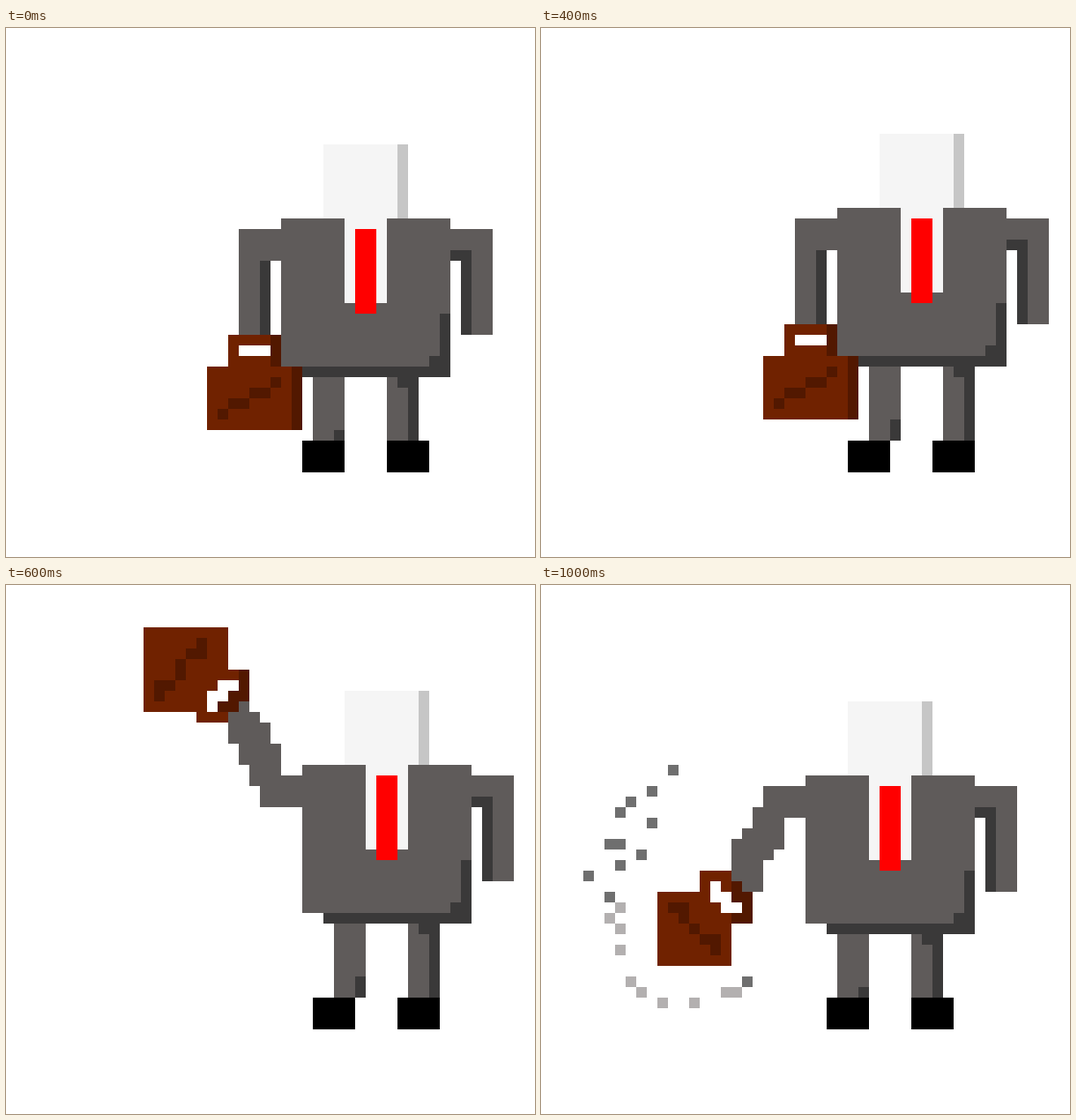
An HTML page that plays this animation: 600 px wide and 600 px high, repeating every 1.2 s.

```html
<!DOCTYPE html>
<html lang="en">
<head>
<meta charset="utf-8">
<title>Briefcase swing</title>
<style>
html, body { margin: 0; width: 100%; height: 100%; overflow: hidden; background: #fff; }
svg { display: block; width: 100%; height: 100%; shape-rendering: crispEdges; }

.suit { fill: #5f5b5a; }
.fold { fill: #3a3939; }
.skin { fill: #f5f5f5; }
.edge { fill: #c6c6c6; }
.tie { fill: #f00; }
.case { fill: #702200; }
.gap { fill: #fff; }

/* one-cell-high strips */
.seam, .dust, .haze { fill: none; stroke-width: 1; transform: translateY(.5px); }
.seam { stroke: #521800; }
.dust { stroke: #6f6f6f; }
.haze { stroke: #b3b0b0; }

.body, .feet, .rest, .swing { animation: 1.2s step-end infinite; }
.body { animation-name: sway; }
.feet { animation-name: shuffle; }
.rest { animation-name: rest; }
.swing { animation-name: swing; visibility: hidden; }
.raise { animation-delay: -.6s; }
.level { animation-delay: -.4s; }
.lower { animation-delay: -.2s; }

@keyframes sway {
  0%, 100% { transform: translate(0, 0); }
  16.66666% { transform: translate(1px, 0); }
  33.33333%, 50% { transform: translate(2px, -1px); }
  66.66666% { transform: translate(1px, -1px); }
  83.33333% { transform: translate(-1px, 0); }
}
@keyframes shuffle {
  0%, 66.66666%, 100% { transform: translate(0, 0); }
  16.66666% { transform: translate(1px, 0); }
  83.33333% { transform: translate(-1px, 0); }
}
@keyframes rest {
  0% { visibility: visible; }
  50%, 100% { visibility: hidden; }
}
@keyframes swing {
  0% { visibility: visible; }
  16.66666%, 100% { visibility: hidden; }
}
</style>
</head>
<body>
<svg viewBox="0 0 50 50">
  <g class="body">
    <!-- legs run one row long so they still reach the shoes when the body lifts -->
    <path class="suit" d="M29 33h3v7h-3zM36 33h3v7h-3z"/>
    <path class="fold" d="M31 38h1v2h-1zM37 33h2v7h-1v-6h-1z"/>
    <path class="skin" d="M30 11h7v7h-7z"/>
    <path class="edge" d="M37 11h1v7h-1z"/>
    <path class="suit" d="M26 18h16v14h-16zM42 19h4v10h-2v-8h-2z"/>
    <path class="fold" d="M28 32h12v-1h1v-4h1v6h-14zM42 21h2v8h-1v-7h-1z"/>
    <path class="skin" d="M32 18h4v8h-4z"/>
    <path class="tie" d="M33 19h2v8h-2z"/>
    <g class="rest">
      <path class="suit" d="M22 19h4v3h-2v7h-2z"/>
      <path class="fold" d="M24 22h1v7h-1z"/>
      <path class="case" d="M21 29h5v3h2v6h-9v-6h2z"/>
      <path class="seam" d="M25 29h1m-1 1h1m-1 1h1M27 32h1m-1 1h1m-1 1h1m-1 1h1m-1 1h1m-1 1h1M25 33h1M23 34h2M21 35h2M20 36h1"/>
      <path class="gap" d="M22 30h3v1h-3z"/>
    </g>
  </g>

  <path class="feet" d="M28 39h4v3h-4zM36 39h4v3h-4z"/>

  <g class="swing raise">
    <path class="case" d="M13 4h8v4h2v3h-2v2h-3v-1h-5z"/>
    <path class="seam" d="M18 5h1M17 6h2M16 7h1M16 8h1M14 9h2M14 10h1M22 8h1M22 9h1M21 10h2M20 11h2"/>
    <path class="gap" d="M20 9h2v1h-1v1h-1v1h-1v-2h1z"/>
    <path class="suit" d="M22 11h1v1h1v1h1v2h1v3h2v3h-4v-2h-1v-2h-1v-2h-1v-3h1z"/>
  </g>

  <g class="swing level">
    <path class="suit" d="M18 18h9v3h-9z"/>
    <path class="fold" d="M22 20h5v1h-5z"/>
    <path class="case" d="M9 15h6v2h3v5h-3v2h-6z"/>
    <path class="seam" d="M10 16h1M11 17h1M11 18h1M12 19h1M12 20h1M12 21h1M13 22h1M17 18h1M17 19h1M17 20h1M15 21h3"/>
    <path class="gap" d="M16 18h1v3h-1z"/>
    <path class="dust" d="M14 5h1M12 6h1M16 6h1M9 7h1M15 8h1M7 9h1M12 9h1M10 10h1M7 11h1M10 12h1M7 27h1"/>
    <path class="haze" d="M6 11h1M6 13h1M7 14h1M6 16h1M5 21h1M6 22h1M6 24h1M7 25h1M6 26h1"/>
  </g>

  <g class="swing lower">
    <path class="case" d="M15 27h3v2h2v3h-2v4h-7v-7h4z"/>
    <path class="seam" d="M12 30h2M13 31h1M14 32h1M15 33h2M16 34h1M18 28h1M18 29h2M19 30h1M18 31h2"/>
    <path class="gap" d="M16 28h1v1h1v1h1v1h-2v-1h-1z"/>
    <path class="suit" d="M21 19h4v3h-2v3h-1v1h-1v3h-2v-1h-1v-4h1v-1h1v-2h1z"/>
    <path class="dust" d="M12 17h1M10 19h1M8 20h1M7 21h1M10 22h1M6 24h2M9 25h1M7 26h1M4 27h1M6 29h1M19 37h1"/>
    <path class="haze" d="M7 30h1M6 31h1M7 32h1M7 34h1M8 37h1M9 38h1M17 38h2M11 39h1M14 39h1"/>
  </g>
</svg>
</body>
</html>
```
